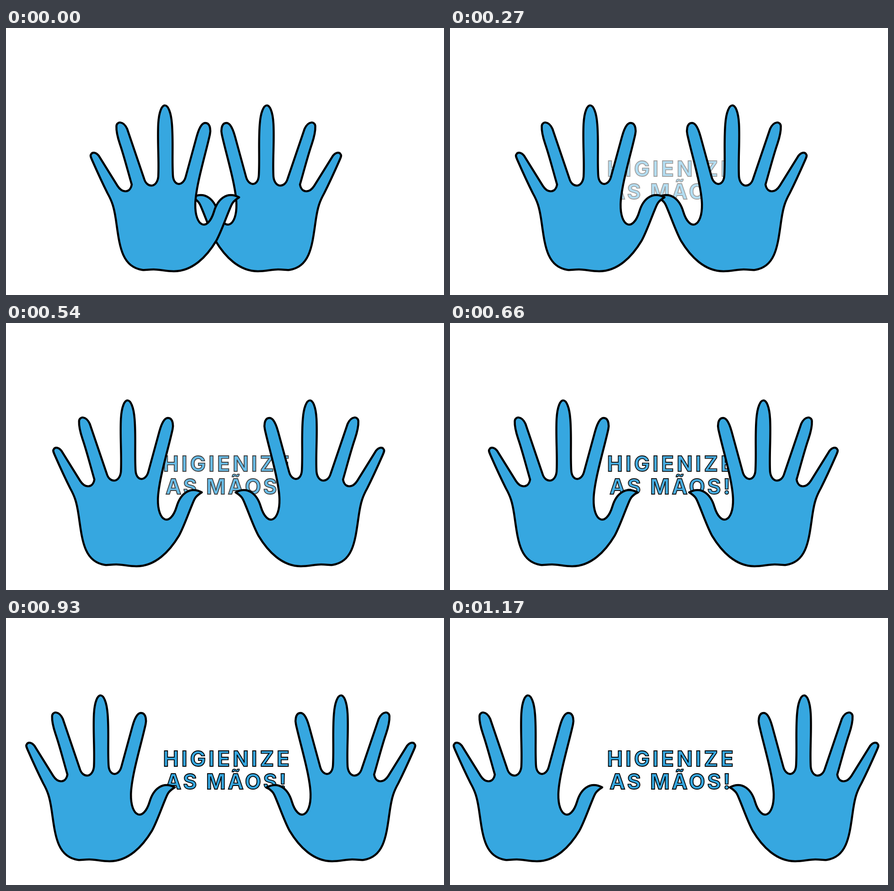
Animation of 958x585 px, one loop 1.64 s. Source, as an HTML page with a canvas:

```html
<!DOCTYPE html>
<html lang="pt">
<head>
<meta charset="utf-8">
<title>Higienize as mãos</title>
<style>
  html, body { margin: 0; width: 100%; height: 100%; overflow: hidden; background: #fff; }
  canvas { display: block; }
</style>
</head>
<body>
<canvas id="stage" width="958" height="585"></canvas>
<script>
const ctx = document.getElementById('stage').getContext('2d');
const BLUE = '#36a7e0';
const LOOP = 1640, STEP = 30, LAST_STEP = 39, FADE_STEPS = 24;
const LEFT_SPEED = -177 / LAST_STEP, RIGHT_SPEED = 204 / LAST_STEP;
const MIRROR = 918;

const little = 'M186 277C188 272 196 271 203 280L244 346C255 363 272 361 275 343';
const ring = 'C266 312 258 280 249 254C243 236 241 225 241.5 215S256 202 265 221L302 330C308 351 330 351 333 326';
const middle = 'C335 290 331 250 333 210C336 156 359 156 363 211C366 250 363 285 365 322C366 347 387 348 393 326';
const index = 'L417 238C424 213 431 206 439 208.5S448 225 446 233C437 275 415 345 414 386';
const thumb = 'C413 436 441 448 455 402C463 375 483 357 510 371C494 381 494 386 488 400S470 448 460 466';
const palm = 'C439 501 408 533 367 533C350 533 336 529 323 529S305 531 298 530' +
  'C250 523 248 470 240 418C236 392 232 380 222 362C210 338 200 316 189 291C185 282 184 279 186 277Z';
const hand = new Path2D(little + ring + middle + index + thumb + palm);

function drawHand(x, flip) {
  ctx.save();
  ctx.translate(x, 0);
  ctx.scale(flip, 1);
  ctx.lineWidth = 4.5;
  ctx.lineJoin = 'round';
  ctx.fill(hand);
  ctx.stroke(hand);
  ctx.restore();
}

function drawLine(text, x, baseline, spacing) {
  ctx.letterSpacing = spacing + 'px';
  ctx.fillText(text, x, baseline);
  ctx.strokeText(text, x, baseline);
}

function drawMessage(opacity) {
  ctx.font = '700 46px Inter, "Open Sans", sans-serif';
  ctx.lineWidth = 1.8;
  ctx.lineJoin = 'miter';
  ctx.miterLimit = 4;
  drawLine('HIGIENIZE', 343.5, 325, 5.9);
  drawLine('AS MÃOS!', 349, 375, 4.7);
  // A white veil fades fill and outline together.
  ctx.fillStyle = `rgba(255, 255, 255, ${1 - opacity})`;
  ctx.fillRect(300, 270, 360, 130);
}

function render(now) {
  const step = Math.min(LAST_STEP, Math.floor((now % LOOP) / STEP));
  ctx.fillStyle = '#fff';
  ctx.fillRect(0, 0, 958, 585);
  ctx.fillStyle = BLUE;
  ctx.strokeStyle = '#000';
  drawMessage(Math.min(1, step / FADE_STEPS));
  ctx.fillStyle = BLUE;
  drawHand(MIRROR + RIGHT_SPEED * step, -1);
  drawHand(LEFT_SPEED * step, 1);
}

const start = performance.now();
function tick() {
  render(performance.now() - start);
  requestAnimationFrame(tick);
}
tick();
</script>
</body>
</html>
```
